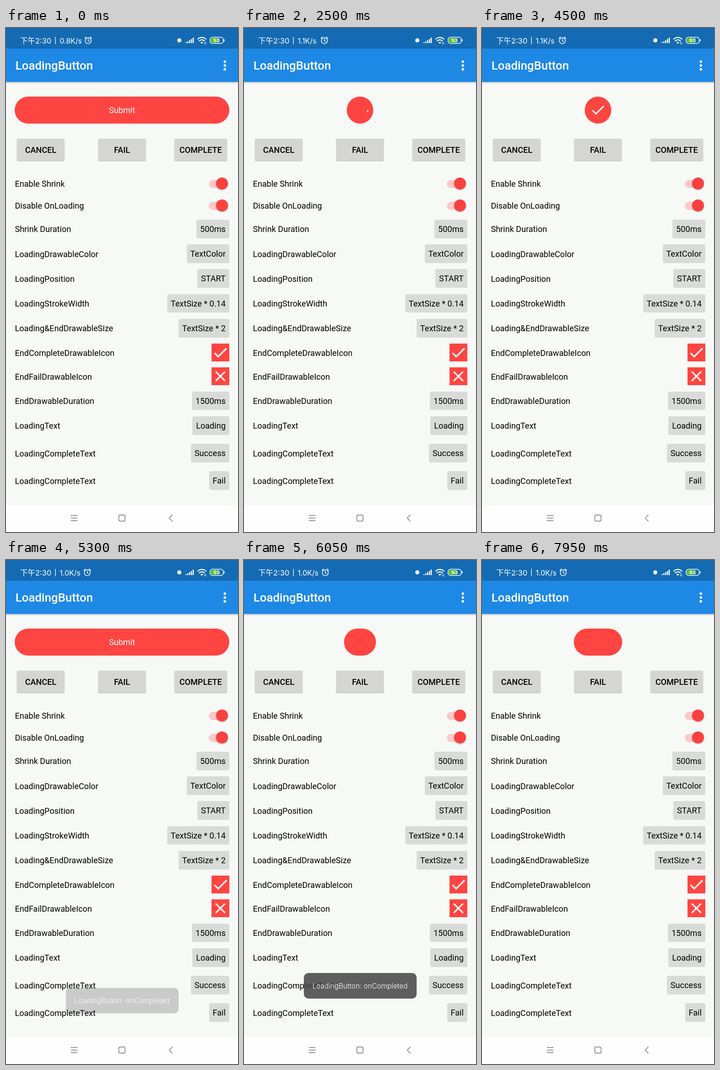
An HTML page that plays this animation: 508 px wide and 1102 px high, repeating every 8000 ms.

```html
<!DOCTYPE html>
<html lang="en">
<head>
<meta charset="utf-8">
<title>LoadingButton</title>
<style>
:root { --red: #ff4541; --sine: cubic-bezier(.3642, 0, .6358, 1); --fosi: cubic-bezier(.4, 0, .2, 1); }
html, body { margin: 0; width: 100%; height: 100%; overflow: hidden; }
body { position: relative; background: #f7f9f7; color: #000; font: 18.11px Roboto, sans-serif; }
body > * { position: absolute; }
.status { left: 0; top: 0; width: 508px; height: 45px; background: #146bb3; }
.bar { left: 0; top: 45px; width: 508px; height: 73px; background: #1e88e5; box-shadow: 0 1px 4px rgba(0,0,0,.3); }
.bar b { position: absolute; left: 20.7px; top: 0; font: 500 25.87px/75px Roboto, sans-serif; color: #fff; }
.nav { left: 0; top: 1042px; width: 508px; height: 60px; background: #fdfefd; box-shadow: 0 -1px #ecedec; }
.chrome { left: 0; top: 0; }

/* main button */
.pill { top: 150px; height: 58.6px; left: 19.4px; right: 19.4px; border-radius: 30px; background: var(--red);
  animation: pill 8s infinite var(--sine); }
@keyframes pill {
  0%, 24.125%, 64.375%, 70.0625% { left: 19.4px; right: 19.4px; }
  30.375%, 58.1875%, 76.3125% { left: 224.7px; right: 224.7px; }
  98% { left: 224.7px; right: 224.7px; animation-timing-function: cubic-bezier(.33, 0, .67, .38); }
  100% { left: 177px; right: 177px; }
}
.submit { left: 0; width: 508px; top: 150px; line-height: 60px; text-align: center; color: #fff;
  animation: submit 8s infinite step-end; }
@keyframes submit { 0%, 64.375% { opacity: 1; } 24.1%, 70.1% { opacity: 0; } }

.spin { left: 235.9px; top: 161.2px; animation: spin-show 8s infinite step-end; }
.spin circle { fill: none; stroke: #fff; stroke-width: 2.53; stroke-linecap: square; transform-origin: 18.1px 18.1px;
  animation: arc 8s infinite var(--fosi), turn 8s infinite linear; }
@keyframes spin-show { 0%, 44.625%, 84.25% { opacity: 0; } 30.875%, 76.8125% { opacity: 1; } }
@keyframes turn {
  0%, 30.875%, 60%, 76.8125% { transform: rotate(0deg); }
  47.525%, 59.99% { transform: rotate(291.6deg); }
  93.4625%, 100% { transform: rotate(291.6deg); }
}
@keyframes arc {
  0%, 30.875%, 60%, 76.8125% { stroke-dasharray: 1 200; stroke-dashoffset: 0; }
  39.2%, 85.1375% { stroke-dasharray: 80 200; stroke-dashoffset: 0; }
  47.525%, 59.99%, 93.4625%, 100% { stroke-dasharray: 1 200; stroke-dashoffset: -79; }
}

.end { left: 235.9px; top: 161.2px; width: 36.2px; height: 36.2px; clip-path: circle(0 at 50% 50%);
  animation: reveal 8s infinite; }
.end.done { animation-delay: 3.57s; }
.end.close { animation-delay: 6.74s; }
@keyframes reveal {
  0% { clip-path: circle(0 at 50% 50%); animation-timing-function: var(--sine); }
  3.75%, 13.749% { clip-path: circle(29px at 50% 50%); }
  13.75%, 100% { clip-path: circle(0 at 50% 50%); }
}

/* action buttons */
.act { top: 242px; height: 48px; border-radius: 2.6px; background: #d5d6d4; overflow: hidden;
  box-shadow: 0 1px 2px rgba(0,0,0,.28); font-weight: 500; line-height: 49px; text-align: center; }
.act i { position: absolute; left: 50%; top: 50%; width: 124px; height: 124px; margin: -62px; border-radius: 50%;
  background: #000; opacity: 0; animation: ripple 8s infinite; }
@keyframes ripple {
  0% { transform: scale(.1); opacity: .1; }
  1.6% { transform: scale(1); opacity: .14; }
  4.7%, 100% { transform: scale(1); opacity: 0; }
}

/* settings */
.row { left: 19.4px; right: 19.4px; height: 40.7px; display: flex; align-items: center; justify-content: space-between; white-space: pre; }
.chip { position: relative; top: -.8px; height: 40.7px; line-height: 42px; padding: 0 7.76px; border-radius: 3.5px; background: #d9dbd9; }
.icon { width: 39px; height: 39px; background: var(--red); position: relative; top: -1px; }
.switch { position: relative; width: 42px; height: 18px; margin-right: 3px; }
.switch::before { content: ""; position: absolute; left: 0; top: 0; width: 36px; height: 18px; border-radius: 9px; background: #fbcac8; }
.switch::after { content: ""; position: absolute; right: 0; top: -4.5px; width: 26px; height: 26px; border-radius: 50%;
  background: #fb413f; box-shadow: 0 1px 3px rgba(0,0,0,.35); }

.toast { left: 130.5px; top: 902.5px; width: 247px; height: 56px; border-radius: 10px; background: rgba(68,68,67,.85);
  color: #fff; font: 300 15.35px/57px Inter, sans-serif; text-align: center; white-space: nowrap; opacity: 0;
  animation: toast 8s infinite; }
@keyframes toast {
  0%, 65.86% { opacity: 0; transform: translateY(46px); animation-timing-function: cubic-bezier(.215, .61, .355, 1); }
  69.6%, 89.625% { opacity: 1; transform: none; animation-timing-function: linear; }
  93.1%, 100% { opacity: 0; transform: none; }
}

/* status bar */
.chrome text { font-family: Inter, "Noto Sans CJK SC", sans-serif; fill: #fff; }
.rate { animation: 8s infinite step-end; }
.r1 { animation-name: r1; } .r2 { animation-name: r2; } .r3 { animation-name: r3; }
@keyframes r1 { 0% { opacity: 1; } 16.875%, 100% { opacity: 0; } }
@keyframes r2 { 0%, 66.25% { opacity: 0; } 16.875% { opacity: 1; } }
@keyframes r3 { 0% { opacity: 0; } 66.25%, 100% { opacity: 1; } }
.alarm { animation: alarm 8s infinite step-end; }
@keyframes alarm { 0% { transform: none; } 16.875% { transform: translateX(-4px); } 66.25%, 100% { transform: translateX(-2px); } }
.data { animation: data 8s infinite step-end; }
@keyframes data { 0%, 19.375% { opacity: .8; } 18.75% { opacity: .4; } }
</style>
</head>
<body>
<svg width="0" height="0">
  <symbol id="done" viewBox="0 0 24 24"><path fill="#fff" d="M9 16.17 4.83 12l-1.42 1.41L9 19 21 7l-1.41-1.41z"/></symbol>
  <symbol id="close" viewBox="0 0 24 24"><path fill="#fff" d="M19 6.41 17.59 5 12 10.59 6.41 5 5 6.41 10.59 12 5 17.59 6.41 19 12 13.41 17.59 19 19 17.59 13.41 12z"/></symbol>
</svg>
<div class="status"></div>
<div class="bar"><b>LoadingButton</b></div>
<div class="nav"></div>

<svg class="chrome" width="508" height="1102" fill="none" stroke-linecap="round" stroke-linejoin="round">
  <text x="31" y="33.5" font-size="16.5">下午</text>
  <text x="64" y="33.5" font-size="16.5">2:30</text>
  <path d="M108.3 20v15" stroke="#fff" stroke-width="1.3"/>
  <g font-size="16">
    <text class="rate r1" x="117.5" y="33.5">0.8K/s</text>
    <text class="rate r2" x="117.5" y="33.5">1.1K/s</text>
    <text class="rate r3" x="117.5" y="33.5">1.0K/s</text>
  </g>
  <g class="alarm" stroke="#fff" stroke-width="1.5">
    <circle cx="180" cy="27.8" r="6.6"/>
    <path d="M180 24v4.2l2.8 1.6M172.6 22.4l3.2-2.8M187.4 22.4l-3.2-2.8"/>
  </g>
  <circle cx="379.5" cy="27" r="4.5" fill="#fff"/>
  <path d="M394.2 33v-2M398.2 33v-4M402.2 33v-6.5M406.2 33v-9M410 33v-12" stroke="#fff" stroke-width="2.4" stroke-linecap="butt"/>
  <g stroke="#fff" stroke-width="2.2">
    <path d="M420 24.2a12.6 12.6 0 0 1 17.6 0M423 28.2a8.2 8.2 0 0 1 11.6 0"/>
    <path d="M426.3 31.6a4 4 0 0 1 5 0l-2.5 2z" fill="#fff" stroke-width="1"/>
  </g>
  <path class="data" d="M434.6 31v4.5M437.4 31v4.5" stroke="#fff" stroke-width="1.2"/>
  <rect x="446.8" y="20.2" width="29" height="13.6" rx="5.5" stroke="#fff" stroke-width="1.5"/>
  <path d="M477.7 25v4" stroke="#fff" stroke-width="1.6"/>
  <path d="M452.5 22.2H465v9.6h-12.5a4 4 0 0 1-4-4v-1.6a4 4 0 0 1 4-4z" fill="#62cc1f"/>
  <text x="461.3" y="31" font-size="11" font-weight="700" text-anchor="middle">53</text>
  <g fill="#fff">
    <circle cx="479.2" cy="73.6" r="2.8"/><circle cx="479.2" cy="82" r="2.8"/><circle cx="479.2" cy="90.4" r="2.8"/>
  </g>
  <g stroke="#777" stroke-width="1.5">
    <path d="M142.5 1066h13.5M142.5 1071.5h13.5M142.5 1077.3h13.5M364 1064.8l-6.6 6.8 6.6 6.8"/>
    <rect x="247.2" y="1064.8" width="13.4" height="13.4" rx="3"/>
  </g>
</svg>

<div class="pill"></div>
<div class="submit">Submit</div>
<svg class="spin" width="36.2" height="36.2" overflow="visible"><circle cx="18.1" cy="18.1" r="16.8" pathLength="100"/></svg>
<svg class="end done"><use href="#done"/></svg>
<svg class="end close"><use href="#close"/></svg>

<div class="act" style="left:24px;width:104px">CANCEL</div>
<div class="act" style="left:202px;width:104px">FAIL<i style="animation-delay:6.57s"></i></div>
<div class="act" style="left:368.5px;width:115.5px">COMPLETE<i style="animation-delay:3.47s"></i></div>

<script>
const chip = text => `<span class="chip">${text}</span>`;
const icon = id => `<svg class="icon"><use href="#${id}"/></svg>`;
const toggle = '<span class="switch"></span>';
const rows = [
  [341, 'Enable Shrink', toggle],
  [389, 'Disable OnLoading', toggle],
  [440, 'Shrink Duration', chip('500ms')],
  [494.4, 'LoadingDrawableColor', chip('TextColor')],
  [548.6, 'LoadingPosition', chip('START')],
  [602.8, 'LoadingStrokeWidth', chip('TextSize * 0.14')],
  [657, 'Loading&amp;EndDrawableSize', chip('TextSize * 2')],
  [710.5, 'EndCompleteDrawableIcon', icon('done')],
  [762.6, 'EndFailDrawableIcon', icon('close')],
  [815.7, 'EndDrawableDuration', chip('1500ms')],
  [870, 'LoadingText', chip('Loading')],
  [930.2, 'LoadingCompleteText', chip('Success')],
  [990.4, 'LoadingCompleteText', chip('Fail')],
];
document.body.insertAdjacentHTML('beforeend',
  rows.map(([y, label, control]) =>
    `<div class="row" style="top:${y - 20.35}px"><span>${label}</span>${control}</div>`).join('') +
  '<div class="toast">LoadingButton: onCompleted</div>');
</script>
</body>
</html>
```
